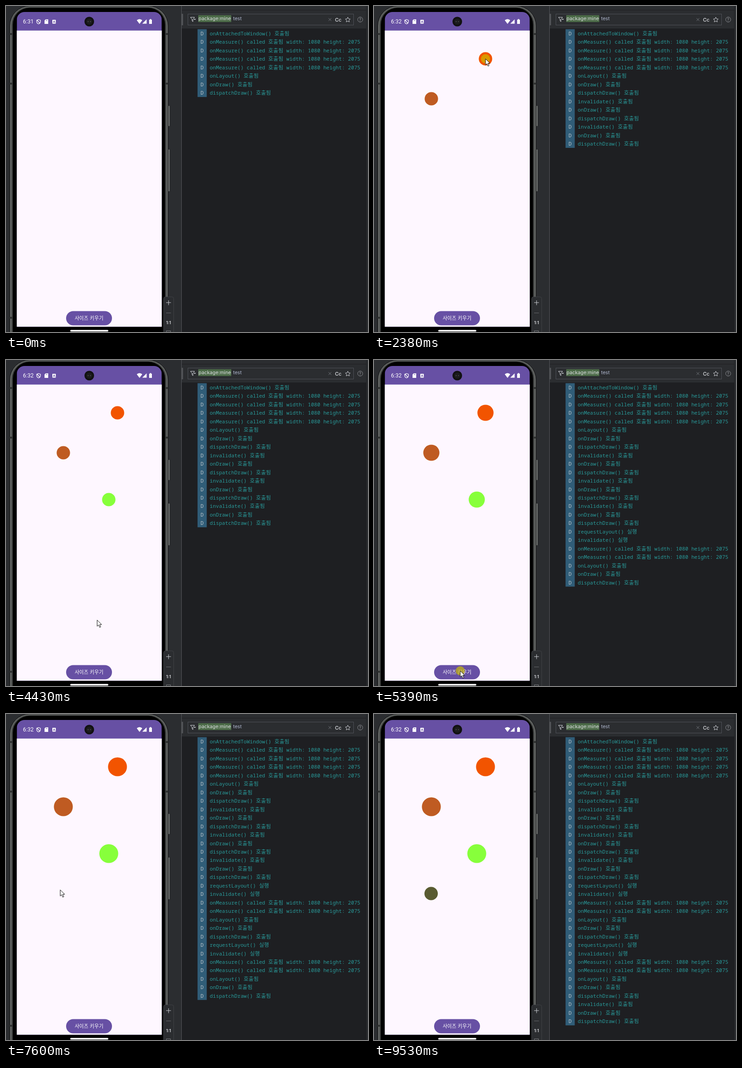
An HTML page for the animation above (9990 ms loop, 789 px wide and 710 px high).

```html
<!DOCTYPE html>
<html lang="ko">
<head>
<meta charset="utf-8">
<style>
  html, body { margin: 0; width: 100%; height: 100%; overflow: hidden; background: #2b2d30; }
  svg { display: block; }
  text { white-space: pre; }
  .log, .level { font: 11.2px "Noto Sans Mono", monospace; fill: #299999; }
  .level { fill: #bbc4ca; }
  .ko { font-family: "Noto Sans CJK KR", "Noto Sans CJK", sans-serif; }
  .log .ko { font-size: 11.9px; }
  .ui { font: 10.7px Inter, sans-serif; fill: #dfe1e5; }
  .line { fill: none; stroke: #ced0d6; }
</style>
</head>
<body>
<svg width="789" height="710" viewBox="0 0 789 710">
  <rect width="789" height="710" fill="#2b2d30"/>

  <!-- phone body -->
  <g fill="#777a78" stroke="#252726">
    <rect x="353" y="217" width="4" height="45"/>
    <rect x="353" y="312" width="4" height="92"/>
  </g>
  <g id="frame"></g>
  <path d="M8 61h6M8 169h6M348 61h5M348 169h5M8 679h6" stroke="#303231" stroke-width="4"/>
  <clipPath id="screen"><rect x="23.5" y="13" width="316" height="685.5"/></clipPath>
  <g clip-path="url(#screen)">
    <rect x="23.5" y="13" width="316" height="720" rx="17" fill="#6750a4"/>
    <rect x="23" y="53.5" width="317" height="650" fill="#fef7ff"/>
  </g>
  <rect x="140" y="705.5" width="83" height="3.5" rx="1.7" fill="#fff"/>

  <!-- status bar -->
  <text id="clock" x="37" y="38" fill="#fff" style="font:12px Roboto,sans-serif"></text>
  <path d="M71 29.5l4 1.5v3c0 2.500-2 4.300-4 5c-2-.7-4-2.500-4-5v-3zM68 31l6 7" fill="none" stroke="#fff" stroke-width="1.3"/>
  <path d="M86.500 29H92V39H84V31.500Z" fill="#fff"/>
  <rect x="101" y="30" width="7.5" height="8.5" rx="1" fill="#fff"/>
  <path d="M87.500 30.500v2M89.500 30.500v2M102.800 36.800l2-5 2 5M103.500 35h2.500" fill="none" stroke="#6750a4"/>
  <circle cx="181.500" cy="34" r="10.5" fill="#111"/>
  <circle cx="181.500" cy="34" r="6.5" fill="#1b1b1d"/>
  <path d="M178 34h2M183 34h2" stroke="#555" stroke-width="1.5"/>
  <path d="M285 31q6-5 12 0l-6 8zM306.500 29v9.500h-9.500zM312 30h1.500v-1.500h3V30h1.500v9h-6z" fill="#fff"/>

  <!-- button -->
  <rect x="131" y="664.5" width="100" height="31" rx="15.5" fill="#6750a4"/>
  <text class="ko" x="181" y="684" fill="#fff" font-size="10.8" font-weight="500" text-anchor="middle">사이즈 키우기</text>

  <g id="dots"></g>

  <!-- zoom controls -->
  <rect x="343.5" y="633.5" width="22" height="90" rx="4" fill="#2b2d30" stroke="#3f4145"/>
  <path class="line" d="M349 646h10.500M354.300 641v10.500"/>
  <path d="M349 668.500h10.500" stroke="#66686c"/>
  <text class="ui" x="354.3" y="693" text-anchor="middle" style="font-size:9px;font-weight:600">1:1</text>
  <rect x="349.5" y="707.5" width="9" height="9" fill="none" stroke="#77797d"/>

  <!-- log panel -->
  <rect x="383" y="49" width="402" height="661" fill="#1e1f22"/>
  <path d="M383 9h402M785.500 0v710" stroke="#1e1f22"/>
  <path d="M382.500 0v710" stroke="#55575b"/>
  <rect x="383" y="17" width="3" height="25" fill="#505256"/>
  <rect x="396.5" y="17.5" width="361" height="24" fill="#2b2d30" stroke="#4e5157"/>
  <path class="line" d="M402 24.500h9l-3.500 4.500v5l-2-1.500v-3.500z"/>
  <path d="M409 28h5l-2.500 2.500z" fill="#ced0d6"/>
  <rect x="419" y="20" width="72" height="15" fill="#4c6b48"/>
  <text class="ui" x="419.5" y="31">package:mine</text>
  <text class="ui" x="495" y="31" style="fill:#b0b8d0">test</text>
  <path d="M703 26.500l6 6m0-6l-6 6" stroke="#74777c"/>
  <text class="ui" x="717" y="33.5" style="font-size:11px;font-weight:500">Cc</text>
  <path class="line" d="M745 24.500l1.600 3.400 3.700.5-2.700 2.600.7 3.700-3.300-1.800-3.300 1.800.7-3.700-2.700-2.600 3.700-.5z"/>
  <circle cx="772" cy="29.5" r="5.5" fill="none" stroke="#8b8d92"/>
  <text class="ui" x="772" y="32.5" text-anchor="middle" style="font-size:8.5px;fill:#a0a2a6">?</text>
  <rect id="gutter" x="417.5" y="50.5" width="20" fill="#305d78"/>
  <g id="rows"></g>

  <g id="pointer">
    <circle id="tap" r="10" fill="#cdbe00" opacity=".65"/>
    <path d="M0 0V13.500L3.200 10.600 5.400 16 7.800 15 5.500 9.800H9.800Z" fill="#fff" stroke="#111" stroke-linejoin="round"/>
  </g>
</svg>
<script>
const LOOP = 9990, ROW = 18.46, RADIUS = 14.6, GROWTH = 3;
const $ = id => document.getElementById(id);

function add(parent, tag, attrs = {}) {
  const el = document.createElementNS('http://www.w3.org/2000/svg', tag);
  for (const key in attrs) el.setAttribute(key, attrs[key]);
  return parent.appendChild(el);
}

// nested shells of the metal case, from the outside in
['#191a1b', '#6a6d6b', '#5c5f5d', '#4a4d4b', '#343635', '#000'].forEach((fill, i) => {
  const inset = i * 1.5;
  add($('frame'), 'rect', {
    x: 7.5 + inset, y: inset * 0.6 - 0.5, width: 346.5 - 2 * inset, height: 800, rx: 44 - inset, fill
  });
});

const brown = { x: 125, y: 202, fill: '#bf5b22' };
const orange = { x: 243, y: 115, fill: '#f25400' };
const green = { x: 224, y: 304, fill: '#87ff3b' };
const olive = { x: 124.5, y: 391, fill: '#595b31' };
const button = { x: 188, y: 677 };

const clicks = [
  { on: brown, press: 950, drawn: 1150 },
  { on: orange, press: 2310, drawn: 2370 },
  { on: green, press: 3810, drawn: 3880 },
  { on: button, press: 5250, drawn: 5390 },
  { on: button, press: 6460, drawn: 6530 },
  { on: olive, press: 7810, drawn: 7950 }
];

const rest = { x: 134, y: 466 };
const moves = [
  { start: 260, end: 950, from: { x: 68, y: 609 }, to: brown },
  { start: 1620, end: 2110, from: brown, to: orange },
  { start: 2970, end: 3810, from: orange, to: green },
  { start: 4220, end: 4600, from: green, to: button },
  { start: 6860, end: 7700, from: button, to: olive, bulge: { x: -70, y: -155 } },
  { start: 7950, end: 8080, from: olive, to: rest },
  { start: 8280, end: 8770, from: rest, to: { x: 712, y: -20 } },
  { start: 9050, end: 9530, from: { x: 754, y: 137 }, to: { x: 727, y: 715 } }
];

// log lines in order, each with the time it appears
const logs = [];
const log = (time, ...lines) => lines.forEach(line => logs.push({ time, line }));
const call = name => name + '() 호출됨';
const measure = 'onMeasure() called 호출됨 width: 1080 height: 2075';
const redraw = [call('onDraw'), call('dispatchDraw')];

log(0, call('onAttachedToWindow'), ...Array(4).fill(measure), call('onLayout'), ...redraw);
for (const { on, press, drawn } of clicks) {
  if (on === button)
    log(drawn, 'requestLayout() 실행', 'invalidate() 실행', measure, measure, call('onLayout'));
  else
    log(press, call('invalidate'));
  log(drawn, ...redraw);
}

logs.forEach((entry, i) => {
  const y = 64 + i * ROW;
  entry.el = add($('rows'), 'g');
  add(entry.el, 'text', { x: 424, y, class: 'level' }).textContent = 'D';
  const text = add(entry.el, 'text', { x: 444, y, class: 'log' });
  for (const run of entry.line.match(/[가-힣]+|[^가-힣]+/g))
    add(text, 'tspan', /[가-힣]/.test(run) ? { class: 'ko' } : {}).textContent = run;
});

const dots = clicks.filter(({ on }) => on !== button).map(({ on, drawn }) => ({
  drawn, el: add($('dots'), 'circle', { cx: on.x, cy: on.y, fill: on.fill })
}));

const easeOut = p => 1 - (1 - p) ** 1.5;
const show = (el, on) => { el.style.display = on ? '' : 'none'; };

function pointerAt(t) {
  const move = moves.findLast(m => m.start <= t);
  if (!move) return null;
  const { start, end, from, to, bulge = { x: 0, y: 0 } } = move;
  const p = easeOut(Math.min(1, (t - start) / (end - start)));
  const along = axis => from[axis] + (to[axis] - from[axis]) * p + bulge[axis] * Math.sin(Math.PI * p);
  return { x: along('x'), y: along('y') };
}

function draw(t) {
  $('clock').textContent = t < clicks[0].drawn ? '6:31' : '6:32';

  const visible = logs.filter(({ time }) => time <= t).length;
  logs.forEach(({ el }, i) => show(el, i < visible));
  $('gutter').setAttribute('height', visible * ROW);

  for (const dot of dots) {
    const resizes = clicks.filter(c => c.on === button && c.drawn > dot.drawn && c.drawn <= t).length;
    show(dot.el, dot.drawn <= t);
    dot.el.setAttribute('r', RADIUS + GROWTH * resizes);
  }

  const pos = pointerAt(t);
  show($('pointer'), pos);
  show($('tap'), clicks.some(c => Math.abs(t - c.drawn) <= 70));
  if (pos) $('pointer').setAttribute('transform', `translate(${pos.x} ${pos.y})`);
}

const origin = performance.now();
function tick() {
  draw((performance.now() - origin) % LOOP);
  requestAnimationFrame(tick);
}
tick();
</script>
</body>
</html>
```
